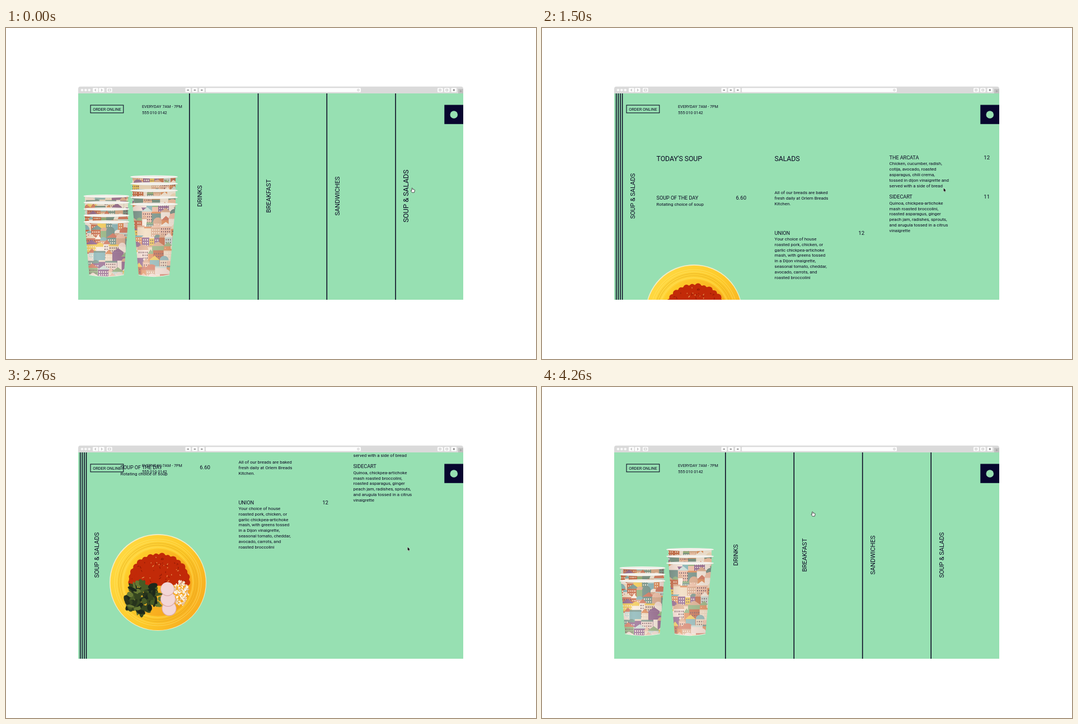
Recreate the animation shown at these times as an HTML page with a canvas. Size 947 by 592 pixels, loop 4290 ms.

```html
<!DOCTYPE html>
<html lang="en">
<head>
<meta charset="utf-8">
<title>Cafe menu</title>
<style>
html, body { margin: 0; width: 100%; height: 100%; overflow: hidden; background: #fff; }
canvas { display: block; width: 947px; height: 592px; }
</style>
</head>
<body>
<canvas id="stage"></canvas>
<script>
const W = 947, H = 592, LOOP = 4290;
const GREEN = '#97e0b2', INK = '#0b0b24', NAVY = '#08062f';
const canvas = document.getElementById('stage');
const dpr = window.devicePixelRatio || 1;
canvas.width = W * dpr;
canvas.height = H * dpr;
const c = canvas.getContext('2d');

const clamp = v => Math.max(0, Math.min(1, v));
const mix = (a, b, p) => a + (b - a) * p;
const span = (t, a, b) => clamp((t - a) / (b - a));
const smooth = p => p * p * (3 - 2 * p);
const decay = (t, start, tau) => t < start ? 0 : 1 - Math.exp((start - t) / tau);

function rng(seed) {
  return () => {
    seed = (seed * 1664525 + 1013904223) >>> 0;
    return seed / 4294967296;
  };
}

// piecewise path through [time, value] points
function along(points, t) {
  if (t <= points[0][0]) return points[0][1];
  for (let i = 1; i < points.length; i++) {
    const [a, u] = points[i - 1], [b, v] = points[i];
    if (t <= b) return mix(u, v, (t - a) / (b - a));
  }
  return points[points.length - 1][1];
}

function box(x, y, w, h, color) {
  c.fillStyle = color;
  c.fillRect(x, y, w, h);
}
function pill(x, y, w, h, r, color) {
  c.fillStyle = color;
  c.beginPath();
  c.roundRect(x, y, w, h, r);
  c.fill();
}
function oval(x, y, rx, ry, color, turn = 0) {
  c.fillStyle = color;
  c.beginPath();
  c.ellipse(x, y, rx, ry, turn, 0, 7);
  c.fill();
}
const dot = (x, y, r, color) => oval(x, y, r, r, color);

function text(str, x, y, size, spacing = 0, align = 'left') {
  c.font = size + 'px Roboto, "Liberation Sans", sans-serif';
  c.letterSpacing = spacing + 'px';
  c.textAlign = align;
  c.fillStyle = INK;
  c.fillText(str, x, y);
}
const title = (s, x, y) => text(s, x, y, 12.4, -0.15);
const item = (s, x, y) => text(s, x, y, 9.2, -0.1);
const price = (s, x, y) => text(s, x, y, 9.6, 0, 'right');
function copy(lines, x, y) {
  lines.forEach((s, i) => text(s, x, y + i * 9.93, 8));
}

// ---- browser bar ----
function drawBar() {
  pill(129, 104.7, 688, 16, [4, 4, 0, 0], '#dadada');
  for (const x of [136, 142.3, 148.7]) dot(x, 111, 2.3, '#f8f8f8');
  for (const x of [155, 166, 180, 320.5, 332.5, 345, 771, 783, 795.5])
    pill(x, 107.2, 9.6, 7.6, 1.2, '#fdfdfd');
  pill(357, 107.2, 277, 7.6, 1.2, '#fdfdfd');
  c.lineWidth = 0.8;
  c.strokeStyle = '#777';
  c.beginPath();
  c.moveTo(160.8, 109); c.lineTo(158.8, 111); c.lineTo(160.8, 113);
  c.moveTo(170, 109); c.lineTo(172, 111); c.lineTo(170, 113);
  c.stroke();
  c.strokeStyle = '#b5b5b5';
  c.strokeRect(182.6, 109.3, 4.4, 3.4);
  c.strokeRect(774, 109.5, 3.2, 3);
  c.strokeRect(786, 109.5, 3.4, 3);
  for (const x of [325.2, 337.3, 349.8]) box(x - 1.7, 110, 3.4, 2.2, '#999');
  dot(800.3, 111, 1.7, '#888');
  c.beginPath();
  c.arc(629.5, 111, 1.6, 0, 7);
  c.stroke();
  box(808, 109, 9, 8, '#c0c0c0');
  box(810.5, 112.6, 4, 0.8, '#999');
  box(812.1, 111, 0.8, 4, '#999');
}

// ---- paper cups ----
const TONES = ['#f1dcc0', '#e08a55', '#c4623f', '#f2c84e', '#8c5f8c', '#8db07a', '#7fb2b6',
  '#f8ece0', '#dba98a', '#6f8f86', '#f0bfa6', '#d2735a', '#f6e0d6', '#c9dcd6'];

function townArt(seed, w, h) {
  const art = document.createElement('canvas'), k = 3;
  art.width = w * k;
  art.height = h * k;
  const g = art.getContext('2d'), rnd = rng(seed);
  const tone = () => TONES[Math.floor(rnd() * TONES.length)];
  g.scale(k, k);
  g.fillStyle = '#d9c46c';
  g.fillRect(0, 0, w, h);
  for (let y = 2; y < h + 20; y += 14) {
    for (let x = -6; x < w;) {
      const bw = 8 + rnd() * 14, bh = 10 + rnd() * 18, top = y - bh / 2, roof = rnd();
      g.fillStyle = tone();
      g.fillRect(x, top, bw, bh + 8);
      g.fillStyle = tone();
      g.beginPath();
      if (roof < 0.5) {
        g.moveTo(x - 1, top); g.lineTo(x + bw / 2, top - 8); g.lineTo(x + bw + 1, top);
      } else if (roof < 0.75) {
        g.arc(x + bw / 2, top, bw / 2, Math.PI, 0);
      } else {
        g.rect(x, top - 2, bw, 3);
      }
      g.fill();
      if (rnd() < 0.55) {
        g.fillStyle = rnd() < 0.7 ? '#fff3e2' : '#6b4a55';
        for (let wy = top + 3; wy < top + bh; wy += 5)
          for (let wx = x + 2; wx < x + bw - 2; wx += 3.6) g.fillRect(wx, wy, 1.5, 2.6);
      }
      x += bw * (0.75 + rnd() * 0.3);
    }
  }
  const fade = g.createLinearGradient(0, 0, 0, h);
  fade.addColorStop(0, 'rgba(255,245,225,.05)');
  fade.addColorStop(1, 'rgba(255,240,230,.28)');
  g.fillStyle = fade;
  g.fillRect(0, 0, w, h);
  return art;
}

const small = { x: 179.5, y: 346.5, rim: 41, top: 38.5, foot: 31, base: 443, step: 11.5, art: townArt(11, 86, 135) };
const tall = { x: 264.5, y: 314.8, rim: 42.5, top: 38.5, foot: 27.5, base: 443, step: 12.2, art: townArt(29, 86, 135) };

function rim(cup, y) {
  oval(cup.x, y + 0.7, cup.rim, 2.5, '#d8dccf');
  oval(cup.x, y, cup.rim, 2.4, '#faf8f4');
  oval(cup.x, y - 0.5, cup.rim - 3, 0.8, '#ebe7df');
}
function drawCup(cup, extra) {
  const { x, y, top, foot, base, step, art } = cup;
  for (let k = extra; k > 0; k--) {
    const ry = y - k * step;
    c.drawImage(art, 0, 50 * k, art.width, step * 3, x - top, ry, top * 2, step);
    box(x - top, ry, top * 2, step, 'rgba(110,80,30,.12)');
    rim(cup, ry);
  }
  c.save();
  c.beginPath();
  c.moveTo(x - top, y);
  c.lineTo(x - foot, base - 2);
  c.quadraticCurveTo(x, base + 5, x + foot, base - 2);
  c.lineTo(x + top, y);
  c.clip();
  c.drawImage(art, x - 43, y - 4, 86, 135);
  const shade = c.createLinearGradient(x - top, 0, x + top, 0);
  shade.addColorStop(0, 'rgba(90,60,50,.12)');
  shade.addColorStop(0.3, 'rgba(255,255,255,.1)');
  shade.addColorStop(1, 'rgba(90,60,50,.14)');
  box(x - top, y, top * 2, 140, shade);
  c.restore();
  c.strokeStyle = '#f3efe6';
  c.lineWidth = 1.2;
  c.beginPath();
  c.moveTo(x - foot, base - 1.5);
  c.quadraticCurveTo(x, base + 5, x + foot, base - 1.5);
  c.stroke();
  rim(cup, y);
}

// ---- soup bowl, filled step by step ----
const FILL = [[0, 0], [1000, 1], [1150, 2], [2310, 3], [2430, 4], [2550, 5], [3450, 0], [3600, 1]];

function drawBowl(x, y, level) {
  c.save();
  c.translate(x, y);
  const glaze = c.createLinearGradient(-70, -50, 80, 40);
  glaze.addColorStop(0, '#ffd840');
  glaze.addColorStop(0.55, '#fdca2a');
  glaze.addColorStop(1, '#f8ad20');
  dot(0, 0, 86.5, '#f7edc4');
  dot(0.2, 0.4, 85.2, glaze);
  c.lineWidth = 0.8;
  for (let r = 63; r < 80; r += 3.6) {
    c.strokeStyle = r % 2 < 1 ? 'rgba(214,150,20,.55)' : 'rgba(255,236,130,.6)';
    c.beginPath();
    c.arc(0, 0, r, 0, 7);
    c.stroke();
  }
  const well = c.createLinearGradient(-55, -30, 55, 30);
  well.addColorStop(0, '#ffcf2c');
  well.addColorStop(1, '#f5a01a');
  dot(0, 0, 60, well);
  const rnd = rng(77);
  if (level === 0) {
    oval(22, -42, 30, 13, '#f7a91d', 0.35);
    oval(-22, -32, 25, 16, '#ffc928', -0.6);
    for (let i = 0; i < 12; i++)
      oval(40 + rnd() * 8, -42 + rnd() * 24, 1.8, 0.9, '#d9791b', rnd() * 3);
  }
  if (level === 1) {
    dot(0, 0, 59, '#c22a08');
    for (let i = 0; i < 26; i++)
      dot((rnd() - 0.5) * 80, (rnd() - 0.5) * 80, 0.7, '#e08a3c');
  }
  if (level > 1) {
    c.fillStyle = '#c22a08';
    c.beginPath();
    c.ellipse(2, 0, 54, 50, 0, Math.PI, 0);
    c.quadraticCurveTo(5, 12, -52, 0);
    c.fill();
    for (let i = 0; i <= 15; i++) {
      const a = Math.PI * (1 + i / 15);
      dot(2 + Math.cos(a) * 50, Math.sin(a) * 47, 4.5 + rnd() * 2.5, '#c22a08');
    }
    for (let i = 0; i < 48; i++) {
      const a = Math.PI * (1 + rnd()), r = Math.sqrt(rnd());
      oval(2 + Math.cos(a) * r * 50, Math.sin(a) * r * 46, 0.7 + rnd() * 2, 0.7,
        i % 3 ? '#951b06' : '#e59a55', rnd() * 3);
    }
  }
  if (level > 2) {
    const leaf = ['#27331c', '#485b25', '#35451f', '#667833', '#1c281b'];
    for (let i = 0; i < 110; i++) {
      const a = rnd() * 6.28, r = Math.sqrt(rnd());
      oval(-27 + Math.cos(a) * r * 31, 29 + Math.sin(a) * r * 28,
        4 + rnd() * 5, 2 + rnd() * 3, leaf[i % 5], rnd() * 3);
    }
  }
  if (level > 4) {
    for (let i = 0; i < 110; i++) {
      const a = rnd() * 6.28, r = Math.sqrt(rnd());
      oval(41 + Math.cos(a) * r * 14, 19 + Math.sin(a) * r * 22, 2.4, 1.3,
        ['#f8ead3', '#e4bd96', '#fff5e6'][i % 3], rnd() * 3);
    }
  }
  if (level > 3) {
    for (const [rx, ry, r] of [[20, 47, 13], [18, 30, 13.5], [17, 12, 12.5]]) {
      dot(rx, ry, r, '#dca8a6');
      dot(rx, ry - 0.4, r - 0.9, '#f2d6d6');
    }
  }
  c.restore();
}

// ---- page content ----
function drawMenu(dx, dy, t) {
  c.save();
  c.translate(dx, dy);
  title("TODAY'S SOUP", 204.5, 238.4);
  item('SOUP OF THE DAY', 204.5, 307.4);
  price('6.60', 365, 307.4);
  copy(['Rotating choice of soup'], 204.5, 317.6);
  title('SALADS', 415.5, 238.4);
  copy(['All of our breads are baked', 'fresh daily at Orlem Breads', 'Kitchen.'], 415.5, 296.8);
  item('UNION', 415.5, 369.8);
  price('12', 576, 369.8);
  copy(['Your choice of house', 'roasted pork, chicken, or', 'garlic chickpea-artichoke',
    'mash, with greens tossed', 'in a Dijon vinaigrette,', 'seasonal tomato, cheddar,',
    'avocado, carrots, and', 'roasted broccolini'], 415.5, 379.7);
  item('THE ARCATA', 620.5, 235);
  price('12', 800, 235);
  copy(['Chicken, cucumber, radish,', 'cotija, avocado, roasted', 'asparagus, chili crema,',
    'tossed in dijon vinaigrette and', 'served with a side of bread'], 620.5, 245.2);
  item('SIDECART', 620.5, 305.4);
  price('11', 800, 305.4);
  copy(['Quinoa, chickpea-artichoke', 'mash roasted broccolini,', 'roasted asparagus, ginger',
    'peach jam, radishes, sprouts,', 'and arugula tossed in a citrus', 'vinaigrette'], 620.5, 315.6);
  let level = 0;
  for (const [at, n] of FILL) if (t >= at) level = n;
  drawBowl(271.5, 509.5, level);
  c.restore();
}

function drawHeader() {
  c.strokeStyle = INK;
  c.lineWidth = 1.1;
  c.strokeRect(151, 138, 58.8, 13.8);
  text('ORDER ONLINE', 155.3, 147.6, 7.3);
  text('EVERYDAY 7AM - 7PM', 243, 142.5, 7.2);
  text('555 010 0142', 243, 154.2, 7.3);
  box(783.3, 137.5, 33.7, 34.3, NAVY);
  dot(800.3, 155, 6.8, GREEN);
}

const LABELS = ['DRINKS', 'BREAKFAST', 'SANDWICHES', 'SOUP & SALADS'];

function drawPanels(first, gap, hover) {
  LABELS.forEach((name, i) => {
    const x = first + gap * i;
    box(x, 117, 817 - x, 369, GREEN);
    box(x - 0.8, 117, 1.6, 369, INK);
    c.save();
    c.translate(x + 18.4, 300.6);
    c.rotate(-Math.PI / 2);
    if (i === 3) c.scale(1 + 0.16 * hover, 1 + 0.16 * hover);
    text(name, 0, 4.1, 11.2, -0.08, 'center');
    c.restore();
  });
}

// ---- pointer ----
function drawPointer(x, y, hand) {
  c.save();
  c.translate(x, y);
  c.lineJoin = 'round';
  c.beginPath();
  if (hand) {
    c.moveTo(-1.2, 0.4);
    c.quadraticCurveTo(-0.4, -0.6, 0.4, 0.4);
    c.lineTo(0.6, 2.2);
    c.lineTo(3.6, 2.8);
    c.quadraticCurveTo(4.6, 3.2, 4.3, 5);
    c.lineTo(3.4, 8);
    c.lineTo(-0.4, 8);
    c.lineTo(-2.8, 4.8);
    c.quadraticCurveTo(-2.4, 3.6, -1, 4.6);
    c.closePath();
    c.fillStyle = '#fff';
    c.strokeStyle = '#222';
    c.lineWidth = 0.8;
    c.fill();
    c.stroke();
  } else {
    for (const [px, py] of [[0, 0], [0, 6.2], [1.4, 5], [2.3, 7.2], [3.3, 6.8], [2.4, 4.7], [4.3, 4.5]])
      c.lineTo(px, py);
    c.closePath();
    c.strokeStyle = '#fff';
    c.lineWidth = 0.9;
    c.stroke();
    c.fillStyle = '#111';
    c.fill();
  }
  c.restore();
}

const SCROLL = [[2070, 0], [2190, -4.4], [2240, -5], [2310, -30], [2450, -108], [2600, -150],
  [2760, -160], [2880, -160], [3000, -125], [3150, -40], [3300, 11], [3390, 17.5]];

function cupCount(t) {
  if (t < 2000) return t < 180 ? 4 : t < 330 ? 3 : 2;
  return t < 4020 ? 0 : t < 4140 ? 1 : 2;
}

function draw(t) {
  const back = 1 - smooth(span(t, 3930, 4230));
  const slide = decay(t, 450, 40) * back, fold = decay(t, 450, 126) * back;
  const hover = 1 - smooth(span(t, 450, 600));
  const homeHover = t < 2000 ? hover : 0;
  const first = mix(327.8, 132.7, slide);
  const gap = mix(122.45 + 0.3 * homeHover, 3.6, fold);
  const last = first + gap * 3;

  c.setTransform(dpr, 0, 0, dpr, 0, 0);
  box(0, 0, W, H, '#fff');
  drawBar();
  c.save();
  c.beginPath();
  c.rect(129, 117, 688, 369);
  c.clip();
  box(129, 117, 688, 369, GREEN);
  drawCup(small, cupCount(t));
  drawCup(tall, cupCount(t));
  drawPanels(first, gap, homeHover);
  if (t >= 570 && t < 3945) drawMenu(last - 143.5, along(SCROLL, t), t);
  drawHeader();
  const drift = smooth(span(t, 450, 720)), move = smooth(span(t, 3340, 3680));
  drawPointer(mix(mix(726, 717.6, drift), 483.7, move), mix(286.2, 223.2, move), t < 510 || t >= 4080);
  c.restore();
}

const start = performance.now();
function tick() {
  draw((performance.now() - start) % LOOP);
  requestAnimationFrame(tick);
}
tick();
</script>
</body>
</html>
```
